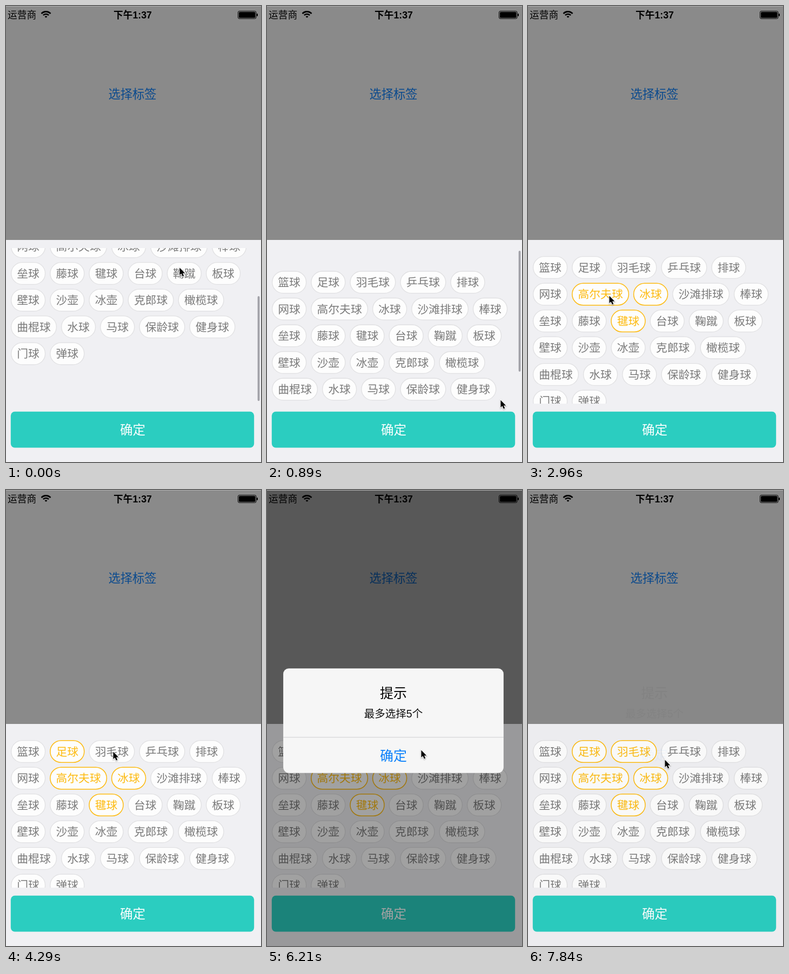
Write an HTML page with a canvas that moves like this. It is 472 px wide and 844 px high and loops after 7.99 s.

```html
<!DOCTYPE html>
<html lang="zh-CN">
<head>
<meta charset="utf-8">
<style>
html, body { margin: 0; height: 100%; overflow: hidden; background: #8a8a8a; }
canvas { display: block; width: 472px; height: 844px; }
</style>
</head>
<body>
<canvas id="stage"></canvas>
<script>
const W = 472, H = 844, LOOP = 7990, TICKS = 54;
const canvas = document.getElementById('stage');
const c = canvas.getContext('2d');
const dpr = window.devicePixelRatio || 1;
canvas.width = W * dpr;
canvas.height = H * dpr;

const ROWS = [
  '篮球 足球 羽毛球 乒乓球 排球',
  '网球 高尔夫球 冰球 沙滩排球 棒球',
  '垒球 藤球 毽球 台球 鞠蹴 板球',
  '壁球 沙壶 冰壶 克郎球 橄榄球',
  '曲棍球 水球 马球 保龄球 健身球',
  '门球 弹球'
].map(row => row.split(' '));

// Times are in ticks of about 148 ms.
const RELEASE = 5, SHOW = 40, HIDE = 51;
const START = { at: -1, x: 321, y: 484 };
const STOPS = [
  { at: 7, x: 432, y: 729 },
  { at: 11, x: 184, y: 590, tag: '毽球' },
  { at: 14, x: 222, y: 538, tag: '冰球' },
  { at: 19, x: 150, y: 536, tag: '高尔夫球' },
  { at: 25, x: 113, y: 484, tag: '足球' },
  { at: 31, x: 198, y: 484, tag: '羽毛球' },
  { at: 39, x: 285, y: 481, tag: '乒乓球' },
  { at: HIDE, x: 253, y: 499, tag: '确定' }
];

const clamp = v => Math.min(1, Math.max(0, v));
const smooth = u => u * u * (3 - 2 * u);
const mix = (a, b, u) => a + (b - a) * u;

function text(str, x, cy, size, color, weight = 300, align = 'center') {
  c.font = `${weight} ${size}px "Liberation Sans", "Noto Sans CJK SC", "Noto Sans CJK", sans-serif`;
  c.textAlign = align;
  c.fillStyle = color;
  c.fillText(str, x, cy + size * .38);
}

function pill(x, y, w, h, r, fill, stroke, line = 1.3) {
  c.beginPath();
  c.roundRect(x, y, w, h, r);
  if (fill) { c.fillStyle = fill; c.fill(); }
  if (stroke) { c.strokeStyle = stroke; c.lineWidth = line; c.stroke(); }
}

function rect(x, y, w, h, fill) {
  c.fillStyle = fill;
  c.fillRect(x, y, w, h);
}

function statusBar() {
  text('运营商', 3, 16.5, 17.7, '#000', 300, 'left');
  text('下午1:37', 234.5, 16.5, 17.7, '#000', 'bold');
  c.strokeStyle = '#000';
  c.lineWidth = 2.6;
  for (const r of [2, 7, 11.6]) {
    c.beginPath();
    c.arc(74, 22, r, -Math.PI * .76, -Math.PI * .24);
    c.stroke();
  }
  pill(429.5, 9.5, 33.5, 14, 2.5, null, '#000', 1);
  pill(431, 11, 30.5, 11, 1.5, '#000');
  pill(464, 14, 2, 5, 1, '#000');
}

// Dragged past the top, then springing back.
function scrollAt(t) {
  return t < RELEASE
    ? mix(88, -45, smooth(t / RELEASE))
    : -45 * Math.exp(-(t - RELEASE) / 2);
}

function isSelected(tag, t) {
  if (tag === '乒乓球' && t > SHOW) return false;
  return STOPS.some(s => s.tag === tag && t > s.at);
}

function scrollBar(scroll, t) {
  const over = Math.max(-scroll, scroll - 31, 0);
  const len = 251 - over;
  const top = mix(453, 731 - len, clamp(scroll / 31));
  c.globalAlpha = clamp((12 - t) / 3);
  pill(465.7, top, 3.8, len, 1.9, '#a2a2a8');
}

function tags(t) {
  const scroll = scrollAt(t);
  c.save();
  c.beginPath();
  c.rect(0, 448, W, 288);
  c.clip();
  ROWS.forEach((row, i) => {
    let x = 9;
    const cy = 484 + i * 49.5 - scroll;
    for (const name of row) {
      const w = name.length * 20.8 + 22.6;
      const on = isSelected(name, t);
      pill(x + .6, cy - 20.3, w - 1.2, 40.6, 20.3, '#fdfdfd', on ? '#fdbb12' : '#e0e0e2', on ? 1.5 : 1.3);
      text(name, x + w / 2, cy, 20.8, on ? '#fdbb12' : '#7a7a7a');
      x += w + 8;
    }
  });
  scrollBar(scroll, t);
  c.restore();
}

function glass(amount) {
  c.globalAlpha *= amount;
  const shade = c.createLinearGradient(0, 331, 0, 450);
  shade.addColorStop(0, '#e4e4e5');
  shade.addColorStop(1, '#eeeeed');
  rect(31, 331, 406, 192, shade);
  pill(42, 436, 386, 80, 38, '#f3f3f1');
}

function alertBox(t) {
  const shown = Math.min(clamp((t - SHOW) / 1.5), clamp((HIDE + 2.08 - t) / 2));
  const zoom = 1 + .2 * Math.exp(-1.68 * (t - SHOW));
  rect(0, 0, W, H, `rgba(0,0,0,${.365 * shown})`);
  c.save();
  c.translate(234, 427);
  c.scale(zoom, zoom);
  c.translate(-234, -427);
  c.save();
  c.globalAlpha = shown ** 2;
  pill(31.5, 331, 405, 192, 10, '#f6f6f6');
  c.clip();
  glass(clamp((t - SHOW - 2) / 2));
  c.globalAlpha = shown ** 2;
  rect(31, 457, 406, 1, '#d0d0d2');
  c.restore();
  c.globalAlpha = shown;
  text('提示', 234, 376, 24.8, '#000', 500);
  text('最多选择5个', 234, 414, 19.4, '#111');
  text('确定', 234, 491, 24.8, '#0a80fb', 500);
  c.restore();
}

// Glides from stop to stop and rests before each press.
function pointerAt(t) {
  let { x, y, at } = START;
  for (const s of STOPS) {
    const from = Math.max(at + 1, s.at - 8);
    const span = Math.max(1, s.at - 2 - from);
    const u = smooth(clamp((t - from) / span));
    x = mix(x, s.x, u);
    y = mix(y, s.y, u);
    at = s.at;
  }
  return [x, y];
}

function pointer(t) {
  const [x, y] = pointerAt(t);
  if (STOPS.some(s => s.tag && s.at === t)) {
    c.beginPath();
    c.arc(x + 3, y, 10, 0, 7);
    c.strokeStyle = '#111';
    c.lineWidth = 1.2;
    c.stroke();
  }
  c.save();
  c.translate(x + .5, y + .5);
  c.shadowColor = 'rgba(0,0,0,.35)';
  c.shadowBlur = 2 * dpr;
  c.shadowOffsetY = dpr;
  const arrow = new Path2D('M0 0V13.6L3.1 10.7 5.4 16 7.8 15 5.5 9.9H9.8Z');
  c.strokeStyle = '#fff';
  c.lineWidth = 1.8;
  c.stroke(arrow);
  c.shadowColor = 'transparent';
  c.fillStyle = '#000';
  c.fill(arrow);
  c.restore();
}

function draw(t) {
  c.setTransform(dpr, 0, 0, dpr, 0, 0);
  rect(0, 0, W, H, '#8a8a8a');
  text('选择标签', 234, 162.5, 22.3, '#0a4a8e');
  statusBar();
  rect(0, 433, W, 411, '#f0f0f3');
  tags(t);
  pill(8.8, 750.8, 450.4, 66.6, 7.4, '#2bcdc0');
  text('确定', 234.5, 784, 23.6, '#fff');
  if (t > SHOW) alertBox(t);
  rect(0, 0, W, 1, '#b0b0b0');
  pointer(t);
}

// The picture advances once per tick, like a screen recording.
function frame(now) {
  const ms = now % LOOP;
  draw(Math.min(TICKS - 1, Math.floor((ms + 9) / LOOP * TICKS)));
  requestAnimationFrame(frame);
}
draw(0);
requestAnimationFrame(frame);
</script>
</body>
</html>
```
